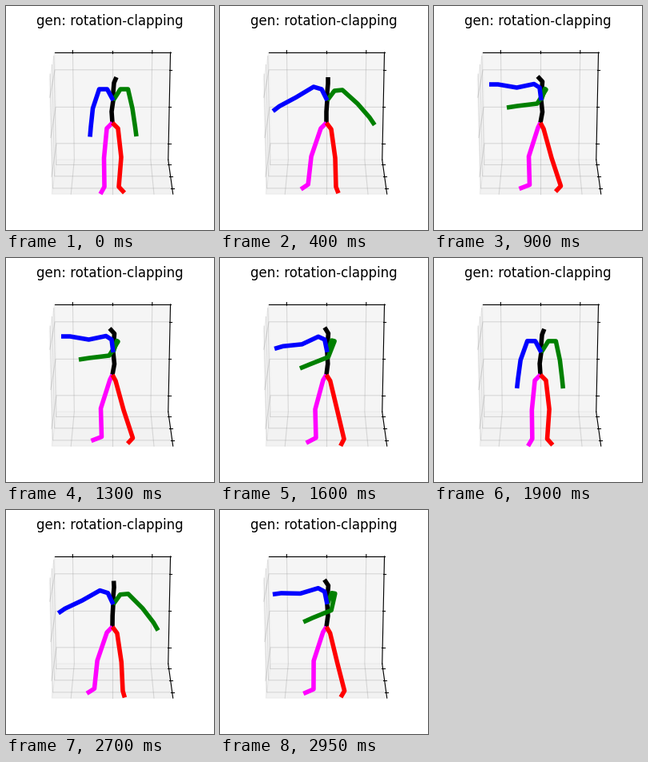
These frames come from a looping animation (260 by 280 pixels, 3000 ms). A matplotlib script:

```python
import numpy as np
import matplotlib.pyplot as plt
from matplotlib.animation import FuncAnimation

W, H, DPI = 260, 280, 100
FRAMES, INTERVAL = 60, 50

# Bone vectors on screen (dx, dy) in three poses: arms down, wide, to the front.
SPINE = [
    [(-1, -14), (2, -14), (0, -10), (1, -12), (3, -7)],
    [(0, -14), (1, -14), (0, -10), (1, -11), (0, -8)],
    [(2.5, -13.5), (-1.5, -14.5), (0.5, -10), (1, -13.5), (-6, -6.5)],
]
LEFT_LEG = [
    [(-7, 7), (-3.5, 37), (0.5, 36), (-5, 9)],
    [(-7, 7), (-12, 35), (-4, 35), (-9, 6)],
    [(-3, 6), (-11.5, 36), (1, 35.5), (-13, 5)],
]
RIGHT_LEG = [
    [(7, 7), (4, 36), (-3, 37), (7, 7.5)],
    [(6, 8), (5, 36), (1, 36), (3, 8)],
    [(4, 7.5), (10, 36.5), (11.5, 35), (-6.5, 7)],
]
RIGHT_ARM = [
    [(9, -14), (9.5, 0), (5.5, 24), (3.5, 23.5), (1.5, 11.5)],
    [(9, -12), (10, -1), (19, 17), (15, 17), (6.5, 9.5)],
    [(4.5, -14.5), (1.5, 1), (-11, 17.5), (-25, 3), (-13, 2)],
]
LEFT_ARM = [
    [(-7.5, -14), (-10, 0), (-8, 24), (-2.5, 23.5), (-1, 12)],
    [(-7, -14), (-10, -3), (-22, 13), (-21, 11), (-8, 6)],
    [(-2, -16), (-7, -4.5), (-21.5, 4.5), (-23.5, -4), (-11, 0)],
]
PELVIS = (133, 146)
DOWN, WIDE, FRONT = range(3)
CLAPS = [(0, DOWN), (8.5, WIDE), (18, FRONT), (29, FRONT), (39, DOWN),
         (42, DOWN), (52.5, WIDE), (62, FRONT)]


def add_depth(poses):
    """Give each bone one fixed length by leaning it towards the viewer."""
    flat = np.array(poses, float)
    squares = (flat ** 2).sum(axis=2)
    depth = np.sqrt(squares.max(axis=0) - squares)
    return np.dstack([flat, depth])


def blend(bones, frame):
    """Turn the bones between the two poses around this frame."""
    for (t0, a), (t1, b) in zip(CLAPS, CLAPS[1:]):
        if frame < t1:
            break
    s = (frame - t0) / (t1 - t0)
    s = s * s * (3 - 2 * s)
    mix = (1 - s) * bones[a] + s * bones[b]
    length = np.linalg.norm(bones[0], axis=1, keepdims=True)
    return (mix * length / np.linalg.norm(mix, axis=1, keepdims=True))[:, :2]


def joints(start, bones, frame):
    return np.vstack([start, start + np.cumsum(blend(bones, frame), axis=0)])


# Perspective room: x to the right, y up, z towards the viewer.
L = 0.7 * 25 / 24
TICKS = (-0.5, 0, 0.5)
ELEV = np.radians(110)


def project(x, y, z):
    x, y, z = x * 0.8163, y * 0.8163, z * 0.6122
    up = np.sin(ELEV) * y + np.cos(ELEV) * z
    depth = 10 + np.cos(ELEV) * y - np.sin(ELEV) * z
    return 133.1 + 1243.2 * x / depth, 144.6 - 1243.2 * up / depth


def path(*points):
    return np.array([project(*p) for p in points]).T


fig = plt.figure(figsize=(W / DPI, H / DPI), dpi=DPI, facecolor="white")
ax = fig.add_axes([0, 0, 1, 1])
ax.set_xlim(0, W)
ax.set_ylim(H, 0)
ax.axis("off")


def pane(shade, *corners):
    ax.fill(*path(*corners), fc=str(shade), ec=str(shade), alpha=0.5, lw=1, zorder=1)


def grid(*points):
    ax.plot(*path(*points), color=(0.5, 0.5, 0.5, 0.25), lw=0.8, zorder=2)


def edge(*points):
    ax.plot(*path(*points), color="black", lw=0.8, zorder=3)


pane(0.95, (-L, -L, -L), (-L, L, -L), (-L, L, L), (-L, -L, L))
pane(0.9, (-L, -L, -L), (L, -L, -L), (L, -L, L), (-L, -L, L))
pane(0.925, (-L, -L, -L), (L, -L, -L), (L, L, -L), (-L, L, -L))

inner, outer = L * (1 - 0.2 / 12), L * (1 + 0.4 / 12)
for v in TICKS:
    grid((v, L, -L), (v, -L, -L), (v, -L, L))
    grid((L, v, -L), (-L, v, -L), (-L, v, L))
    grid((L, -L, v), (-L, -L, v), (-L, L, v))
    edge((v, inner, -L), (v, outer, -L))
    edge((inner, v, -L), (outer, v, -L))
    edge((inner, -L, v), (outer, -L, v))
edge((-L, L, -L), (L, L, -L))
edge((L, L, -L), (L, -L, -L))
edge((L, -L, -L), (L, -L, L))

ax.text(130, 24.5, "gen: rotation-clapping", fontsize=12, family="DejaVu Sans",
        ha="center", va="baseline")

spine, *legs_and_arms = map(add_depth, (SPINE, LEFT_LEG, RIGHT_LEG, RIGHT_ARM, LEFT_ARM))
lines = [ax.plot([], [], color=color, lw=4, solid_capstyle="butt",
                 solid_joinstyle="round", zorder=4)[0]
         for color in ("black", "magenta", "red", "green", "blue")]


def update(frame):
    back = joints(PELVIS, spine, frame)
    pelvis, chest = back[0], back[2]
    starts = (pelvis, pelvis, chest, chest)
    limbs = [joints(p, bones, frame) for p, bones in zip(starts, legs_and_arms)]
    for line, points in zip(lines, [back, *limbs]):
        line.set_data(*points.T)
    return lines


anim = FuncAnimation(fig, update, frames=FRAMES, interval=INTERVAL, repeat=True,
                     repeat_delay=0)
plt.show()
```
